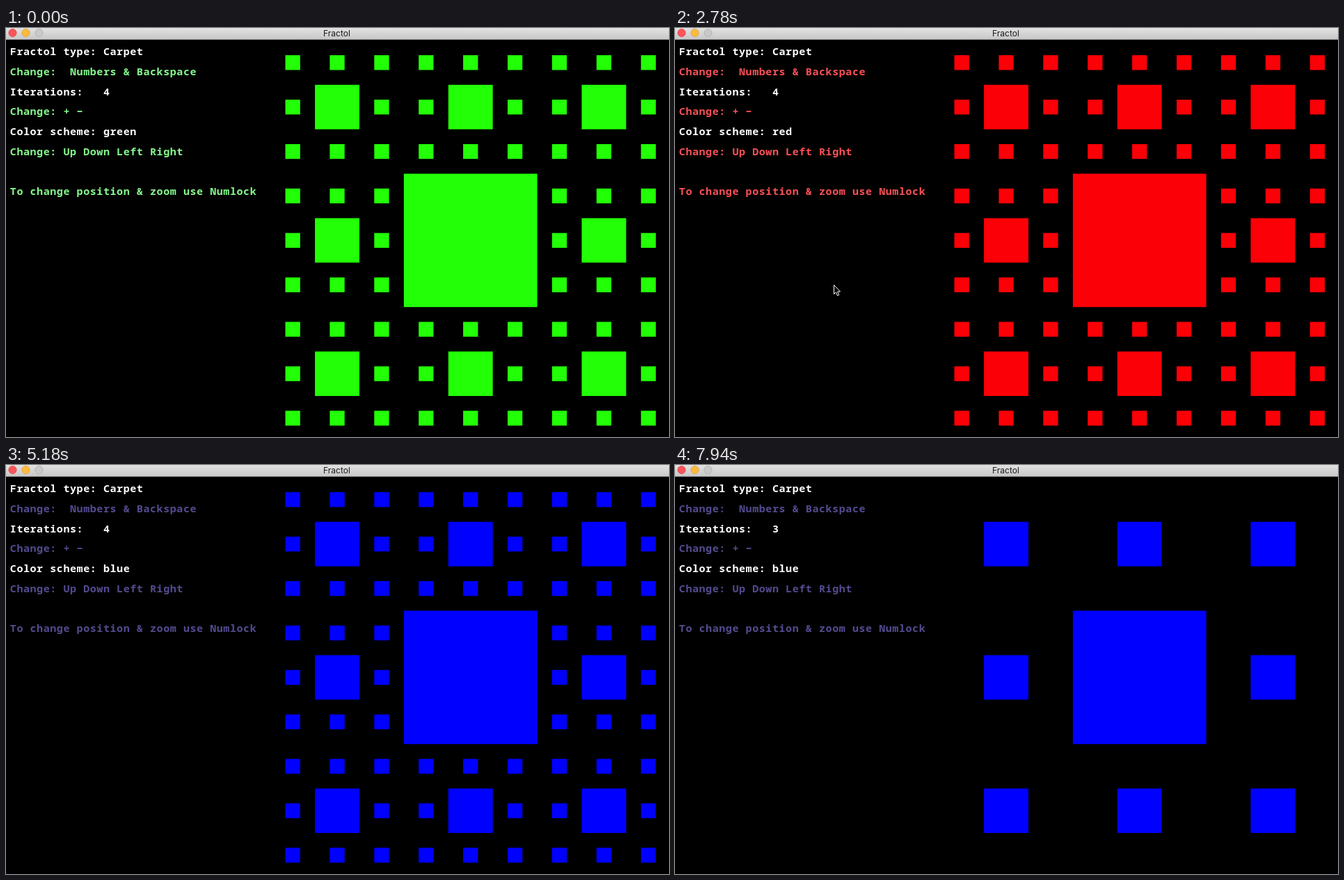
Recreate the animation shown at these times as an HTML page with a canvas. Size 953x588 px, loop 8000 ms.

```html
<!DOCTYPE html>
<html lang="en">
<head>
<meta charset="utf-8">
<title>Fractol</title>
<style>
  html, body { margin: 0; width: 100%; height: 100%; overflow: hidden; background: #000; }
  canvas { display: block; }
</style>
</head>
<body>
<canvas id="stage" width="953" height="588"></canvas>
<script>
const ctx = document.getElementById('stage').getContext('2d');
const LOOP = 8000, STEP = 60;

const schemes = {
  green: { fill: '#22ff06', text: '#86f98c' },
  red: { fill: '#fc0007', text: '#fb5055' },
  blue: { fill: '#0000ff', text: '#534b8f' }
};

// Key points of the pointer's visit
const visit = [
  { t: 2120, x: 638, y: 548 },
  { t: 2240, x: 224.5, y: 410.5 },
  { t: 2660, x: 225, y: 403 },
  { t: 2780, x: 228.5, y: 369.5 },
  { t: 3260, x: 212, y: 565 }
];

const lerp = (a, b, k) => a + (b - a) * k;

// Fills the middle ninth, then repeats in the eight cells around it.
function carpet(x, y, size, depth) {
  if (depth < 1) return;
  const third = size / 3;
  for (let row = 0; row < 3; row++) {
    for (let col = 0; col < 3; col++) {
      const left = x + col * third, top = y + row * third;
      if (row === 1 && col === 1) ctx.fillRect(left, top, third, third);
      else carpet(left, top, third, depth - 1);
    }
  }
}

function drawLabels(name, tint, iterations) {
  const lines = [
    'Fractol type: Carpet', 'Change:  Numbers & Backspace',
    'Iterations:   ' + iterations, 'Change: + −',
    'Color scheme: ' + name, 'Change: Up Down Left Right',
    '', 'To change position & zoom use Numlock'
  ];
  ctx.font = '600 15px "Noto Sans Mono", monospace';
  ctx.letterSpacing = '0.58px';
  ctx.textAlign = 'left';
  lines.forEach((line, i) => {
    ctx.fillStyle = i % 2 ? tint : '#fff';
    ctx.fillText(line, 5.8, 39 + i * 28.75);
  });
}

function drawButton(x, fill, edge) {
  ctx.beginPath();
  ctx.arc(x, 7, 5.6, 0, Math.PI * 2);
  ctx.fillStyle = fill;
  ctx.fill();
  ctx.strokeStyle = edge;
  ctx.lineWidth = 0.8;
  ctx.stroke();
}

function drawTitleBar() {
  const shade = ctx.createLinearGradient(0, 0, 0, 17);
  shade.addColorStop(0, '#e2e2e2');
  shade.addColorStop(1, '#c6c6c6');
  ctx.fillStyle = shade;
  ctx.fillRect(0, 0, 953, 16);
  ctx.fillStyle = '#8a8a8a';
  ctx.fillRect(0, 16, 953, 1);
  drawButton(9.5, '#f9555a', '#dd4448');
  drawButton(28.5, '#fbba3e', '#dda036');
  drawButton(47.5, '#c9c9c9', '#acacac');
  ctx.font = '12px Inter, sans-serif';
  ctx.letterSpacing = '0px';
  ctx.textAlign = 'center';
  ctx.fillStyle = '#1c1c1c';
  ctx.fillText('Fractol', 475.5, 11.5);
}

function pointerAt(t) {
  const i = visit.findIndex(p => p.t > t);
  if (i < 1) return null;
  const a = visit[i - 1], b = visit[i];
  const k = (t - a.t) / (b.t - a.t);
  return { x: lerp(a.x, b.x, k), y: lerp(a.y, b.y, k) };
}

function drawPointer({ x, y }) {
  ctx.save();
  ctx.translate(x, y);
  const arrow = new Path2D('M0 0V13L3 10.3L5 15.3L7.2 14.3L5.2 9.5H9Z');
  ctx.fillStyle = '#000';
  ctx.fill(arrow);
  ctx.strokeStyle = '#fff';
  ctx.lineWidth = 1;
  ctx.stroke(arrow);
  ctx.restore();
}

function schemeAt(t) {
  if (t >= 5180) return 'blue';
  return t >= 500 && t < 3320 ? 'red' : 'green';
}

function draw(t) {
  const name = schemeAt(t), scheme = schemes[name];
  const iterations = t < 7760 ? 4 : 3;
  ctx.fillStyle = '#000';
  ctx.fillRect(0, 0, 953, 588);
  ctx.fillStyle = scheme.fill;
  carpet(380.2, 17.8, 575.1, iterations - 1);
  drawLabels(name, scheme.text, iterations);
  drawTitleBar();
  const pointer = pointerAt(t);
  if (pointer) drawPointer(pointer);
}

const start = performance.now();
function tick() {
  const t = (performance.now() - start) % LOOP;
  // The picture advances in steps that fall 20 ms after each multiple.
  draw(Math.floor((t - 20) / STEP) * STEP + 20);
  requestAnimationFrame(tick);
}
tick();
</script>
</body>
</html>
```
